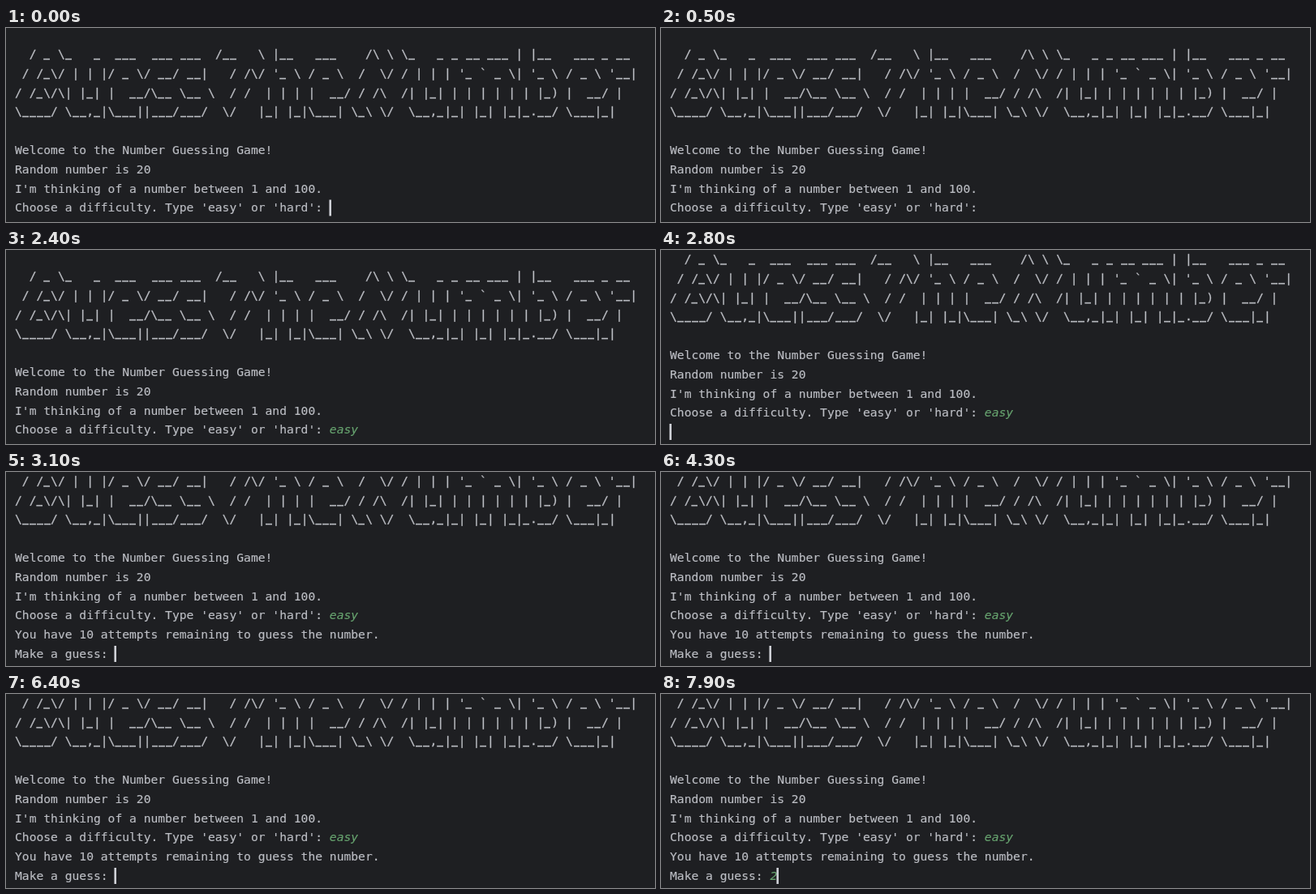
An HTML page that plays this animation: 800x240 px, repeating every 8 s.

```html
<!DOCTYPE html>
<html lang="en">
<head>
<meta charset="utf-8">
<title>Number guessing game</title>
<style>
  html, body { margin: 0; width: 100%; height: 100%; overflow: hidden; background: #1e1f22; }
  #stage { position: relative; width: 800px; height: 240px; overflow: hidden; }
  #stage, #stage * { animation: 8s step-end infinite; }

  #console { position: absolute; left: 11px; top: 20px; animation-name: scroll; }
  pre {
    margin: 0;
    font: 14.65px/23.8px "DejaVu Sans Mono", monospace;
    color: #bcbec4;
    -webkit-text-stroke: .15px;
    white-space: pre;
  }
  #banner { height: 119px; -webkit-text-stroke-width: .3px; }
  #banner i {
    font: 14.7px/0 "Noto Sans Mono", monospace;
    -webkit-mask: repeating-linear-gradient(90deg, #0000 0 .5px, #000 .5px 8.3px, #0000 8.3px 8.82px);
    mask: repeating-linear-gradient(90deg, #0000 0 .5px, #000 .5px 8.3px, #0000 8.3px 8.82px);
  }
  em { color: #67a36f; }

  #stage .first { animation-name: first; }
  #stage .rest { animation-name: rest; }
  #stage .reply { animation-name: reply; }
  #stage .guess { animation-name: guess; }
  #caret {
    position: absolute; left: 0; top: 0; width: 3px; height: 20px;
    background: linear-gradient(90deg, #ced0d699 1px, #ced0d6 1px);
  }
  #stage #caret { animation-name: move, blink; }

  @keyframes scroll {
    0% { transform: none; }
    35% { transform: translateY(-21px); }
    38.75%, 100% { transform: translateY(-45px); }
  }
  @keyframes first { 0% { opacity: 0; } 13.75%, 100% { opacity: 1; } }
  @keyframes rest  { 0% { opacity: 0; } 22.5%, 100% { opacity: 1; } }
  @keyframes reply { 0% { opacity: 0; } 38.75%, 100% { opacity: 1; } }
  @keyframes guess { 0% { opacity: 0; } 98.75%, 100% { opacity: 1; } }
  @keyframes move {
    0% { transform: translate(398px, 212.5px); }
    13.75% { transform: translate(416px, 212.5px); }
    22.5% { transform: translate(434px, 212.5px); }
    35% { transform: translate(10px, 215px); }
    38.75% { transform: translate(133px, 215px); }
    98.75%, 100% { transform: translate(142px, 215px); }
  }
  @keyframes blink {
    0%, 10%, 35%, 53.75%, 66.25%, 80%, 92.5%, 100% { opacity: 1; }
    3.75%, 30%, 47.5%, 60%, 73.75%, 86.25% { opacity: 0; }
  }
</style>
</head>
<body>
<div id="stage">
  <div id="console">
<pre id="banner">  / _ \_   _  ___  ___ ___  /__   \ |__   ___    /\ \ \_   _ _ __ ___ | |__   ___ _ __
 / /_\/ | | |/ _ \/ __/ __|   / /\/ '_ \ / _ \  /  \/ / | | | '_ ` _ \| '_ \ / _ \ '__|
/ /_\/\| |_| |  __/\__ \__ \  / /  | | | |  __/ / /\  /| |_| | | | | | | |_) |  __/ |
\____/ \__,_|\___||___/___/  \/   |_| |_|\___| \_\ \/  \__,_|_| |_| |_|_.__/ \___|_|</pre>
<pre>Welcome to the Number Guessing Game!
Random number is 20
I'm thinking of a number between 1 and 100.
Choose a difficulty. Type 'easy' or 'hard': <em class="first">ea</em><em class="rest">sy</em>
<span class="reply">You have 10 attempts remaining to guess the number.
Make a guess: </span><em class="guess">2</em></pre>
  </div>
  <div id="caret"></div>
</div>
<script>
  // Underscores sit higher and stand apart in the banner.
  const banner = document.getElementById("banner");
  banner.innerHTML = banner.textContent.replace(/_+/g, "<i>$&</i>");
</script>
</body>
</html>
```
